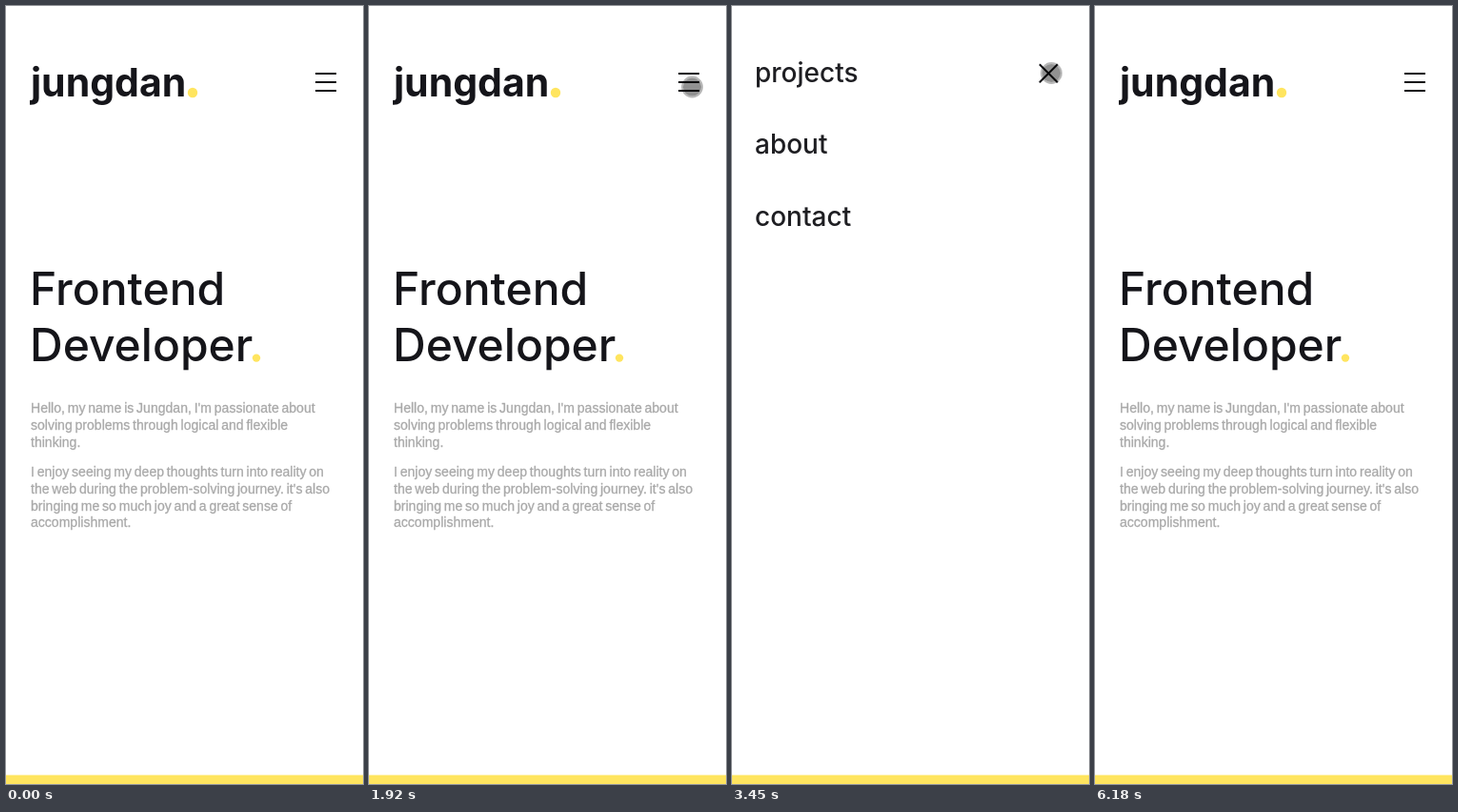
An HTML page for the animation above (6.31 s loop, 375 px wide and 817 px high).

```html
<!DOCTYPE html>
<html lang="en">
<head>
<meta charset="utf-8">
<title>Frontend Developer</title>
<style>
  html, body { margin: 0; width: 100%; height: 100%; overflow: hidden; background: #fff; }
  svg { display: block; width: 100vw; height: 100vh; }
  text { font-family: Inter, sans-serif; font-optical-sizing: none; fill: #15151a; }
  .logo { font-size: 41px; font-weight: 700; }
  .title { font-size: 48px; font-weight: 500; }
  .menu { font-size: 28px; font-weight: 500; fill: #1e1e22; }
  .copy {
    font: 14px "Liberation Sans", Arial, sans-serif;
    letter-spacing: 0.02px; word-spacing: -1.1px;
    fill: #a9a9a9; stroke: #a9a9a9; stroke-width: 0.3px;
  }
  .icon { fill: none; stroke: #0c0c10; stroke-width: 2; }
  .dot, .bar { fill: #ffe55f; }
</style>
</head>
<body>
<svg viewBox="0 0 375 817">
  <rect width="375" height="817" fill="#fff"/>
  <g id="page">
    <text class="logo" x="26" y="94.6">jungdan</text>
    <circle class="dot" cx="196" cy="91" r="5.2"/>
    <path class="icon" d="M325 71h22M325 80h22M325 89h22"/>
    <text class="title" x="25" y="314">Frontend</text>
    <text class="title" x="25" y="373">Developer</text>
    <circle class="dot" cx="263" cy="369.6" r="4.2"/>
    <g id="copy"></g>
  </g>
  <g id="overlay">
    <rect width="375" height="817" fill="#fff"/>
    <g id="menu">
      <text class="menu" x="24" y="80">projects</text>
      <text class="menu" x="24" y="155">about</text>
      <text class="menu" x="24" y="231">contact</text>
      <path class="icon" d="M323 61.2l19 19M342 61.2l-19 19"/>
    </g>
  </g>
  <rect class="bar" y="807.6" width="375" height="9.4"/>
  <g id="cursor">
    <circle r="9.6" fill="#000" fill-opacity="0.43"/>
    <circle r="10.5" fill="none" stroke="#000" stroke-opacity="0.28" stroke-width="1.9"/>
  </g>
</svg>
<script>
const LOOP = 6310;
const STEP = 200 / 3;
const $ = id => document.getElementById(id);
const page = $('page'), overlay = $('overlay'), menu = $('menu'), cursor = $('cursor');

function addParagraph(top, lines) {
  lines.forEach((words, i) => {
    const line = document.createElementNS('http://www.w3.org/2000/svg', 'text');
    line.setAttribute('class', 'copy');
    line.setAttribute('x', 26);
    line.setAttribute('y', Math.round(top + i * 17.8));
    line.textContent = words;
    $('copy').append(line);
  });
}
addParagraph(427, [
  "Hello, my name is Jungdan, I'm passionate about",
  'solving problems through logical and flexible',
  'thinking.'
]);
addParagraph(494, [
  'I enjoy seeing my deep thoughts turn into reality on',
  "the web during the problem-solving journey. it's also",
  'bringing me so much joy and a great sense of',
  'accomplishment.'
]);

const clamp = v => Math.min(1, Math.max(0, v));
const smooth = s => s * s * (3 - 2 * s);
const settle = s => 1 - 2 ** (-9 * s);
const glide = s => smooth(s ** 0.735);

// Each pointer move bends from the previous end towards `via`.
const origin = [316.5, 698.5];
const moves = [
  { from: 520, to: 1120, via: [250, 449], end: [293.5, 199.5], ease: settle },
  { from: 1120, to: 1720, via: [300, 125], end: [343.5, 87.5], ease: smooth },
  { from: 1786, to: 1920, via: [341.5, 86], end: [339.5, 85], ease: smooth },
  { from: 3186, to: 3453, via: [338, 76], end: [335.5, 70.5], ease: smooth },
  { from: 5120, to: 5786, via: [239, 436.5], end: [351.5, 802.5], ease: glide }
];

function pointAt(t) {
  let a = origin;
  for (const { from, to, via, end, ease } of moves) {
    const u = ease(clamp((t - from) / (to - from)));
    if (t < to) {
      return a.map((v, i) => (1 - u) ** 2 * v + 2 * u * (1 - u) * via[i] + u * u * end[i]);
    }
    a = end;
  }
  return a;
}

function draw(ms) {
  // The picture advances at 15 steps per second.
  const t = 520 + (Math.floor((ms - 46) / STEP) - 7) * STEP;

  const rest = (1 - clamp((t - 2190) / 560)) ** 2;
  const shown = (1 - rest) * (1 - clamp((t - 4000) / 200));
  overlay.setAttribute('opacity', shown);
  menu.setAttribute('transform', `translate(0 ${-50 * rest})`);
  page.setAttribute('visibility', shown === 1 ? 'hidden' : 'visible');

  const [x, y] = pointAt(t);
  cursor.setAttribute('transform', `translate(${x} ${y})`);
  cursor.setAttribute('visibility', t > 519 && t < 5800 ? 'visible' : 'hidden');
}

const start = performance.now();
function tick() {
  draw((performance.now() - start) % LOOP);
  requestAnimationFrame(tick);
}
tick();
</script>
</body>
</html>
```
